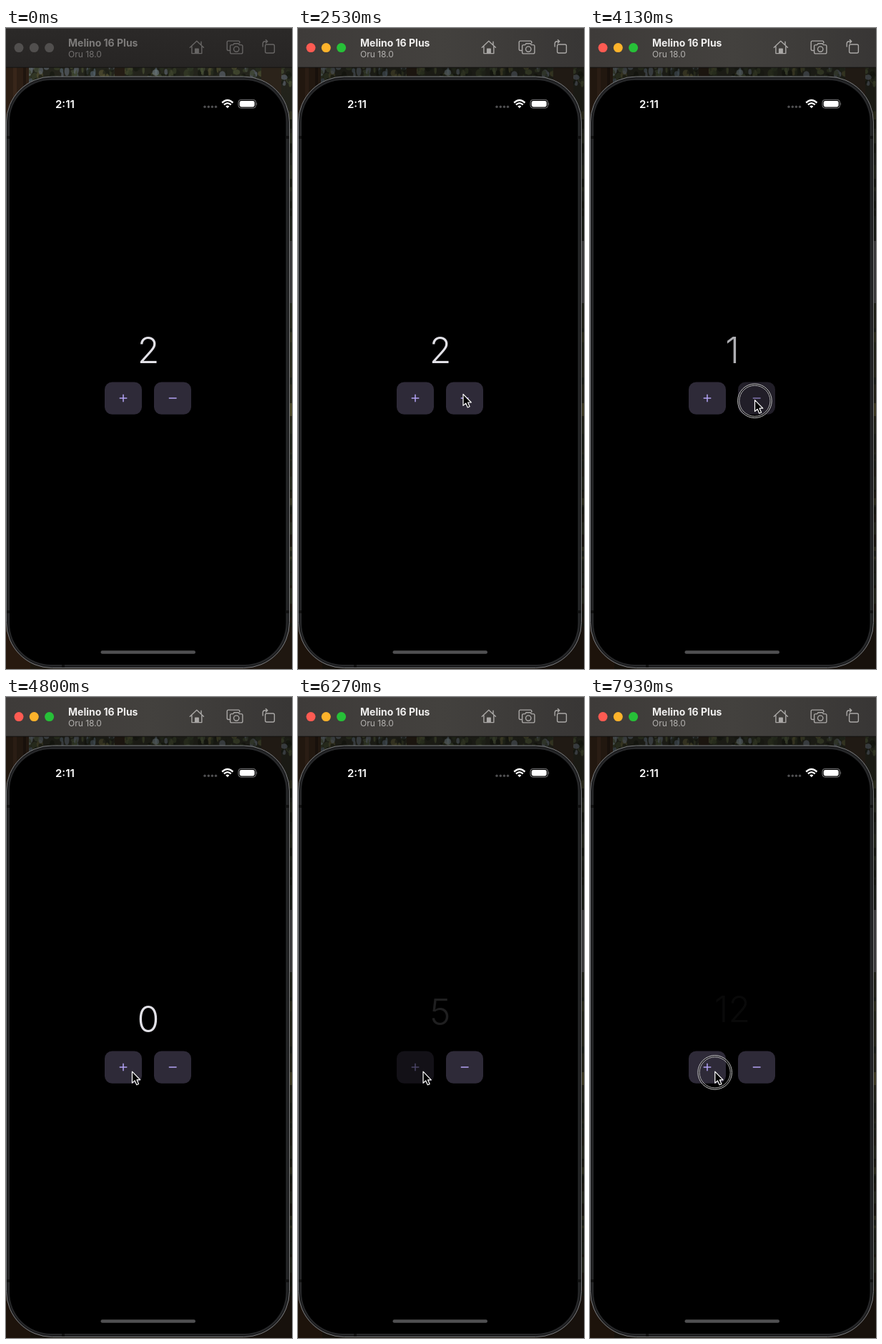
Animation, 400 px wide and 897 px high, one loop 8000 ms. Source, as an HTML page:

```html
<!DOCTYPE html>
<html lang="en">
<head>
<meta charset="utf-8">
<title>Counter</title>
<style>
  html, body { margin: 0; width: 100%; height: 100%; overflow: hidden; background: #000; }
  svg { display: block; width: 100vw; height: 100vh; }
  text { font-family: Inter, Roboto, sans-serif; }
  .bar { --icon: #676564; --title: #7d7b7a; --sub: #737170; }
  .bar.on { --icon: #aaa8a6; --title: #f0efee; --sub: #b3b1af; }
  .bar .fill { fill: url(#idle); }
  .bar.on .fill { fill: url(#live); }
  .bar circle.light { fill: #514f4e; }
  .bar.on .close { fill: #fe5b52; }
  .bar.on .min { fill: #fdb32b; }
  .bar.on .max { fill: #27c038; }
  .title { fill: var(--title); font-weight: 700; font-size: 14px; }
  .sub { fill: var(--sub); font-size: 12px; }
  .icons { fill: none; stroke: var(--icon); stroke-width: 1.4; stroke-linejoin: round; stroke-linecap: round; }
  .sign { stroke: #b3a2f4; stroke-width: 1.5; }
  #num { font-size: 50px; font-weight: 340; text-anchor: middle; fill: #e2e1e7; }
</style>
</head>
<body>
<svg viewBox="0 0 400 897" preserveAspectRatio="none">
  <defs>
    <linearGradient id="idle" x2="0" y2="1">
      <stop stop-color="#2b2928"/><stop offset="1" stop-color="#272524"/>
    </linearGradient>
    <linearGradient id="live" x2="1" y2="0">
      <stop stop-color="#3e3b39"/><stop offset=".5" stop-color="#43413e"/><stop offset="1" stop-color="#383635"/>
    </linearGradient>
    <linearGradient id="wood" x2="0" y2="1">
      <stop stop-color="#26261d"/><stop offset=".3" stop-color="#1b1d18"/>
      <stop offset=".55" stop-color="#2a2a1c"/><stop offset=".8" stop-color="#1a160f"/>
      <stop offset="1" stop-color="#1f160e"/>
    </linearGradient>
    <clipPath id="strip"><rect y="55" width="400" height="842"/></clipPath>
  </defs>

  <g clip-path="url(#strip)">
    <rect width="400" height="897" fill="url(#wood)"/>
    <g id="forest"></g>
    <rect id="shade" width="400" height="897" opacity="0"/>
  </g>

  <rect x="396" y="298" width="4" height="87" fill="#363637"/>
  <rect x=".5" y="68" width="396" height="827.5" rx="64" fill="#27282a" stroke="#77787a" stroke-width="1"/>
  <rect x="2.2" y="69.8" width="392.6" height="824" rx="62" fill="none" stroke="#161617" stroke-width="1"/>
  <path d="M1 153H5M392 153H396M1 817H5M392 817H396M80 891V895" stroke="#111" stroke-width="4"/>
  <rect x="5" y="73" width="386.5" height="818" rx="58"/>

  <g fill="#fff">
    <text x="69" y="112" font-size="15" font-weight="600">2:11</text>
    <g fill="#505052">
      <circle cx="278" cy="110.3" r="1.7"/><circle cx="283.3" cy="110.3" r="1.7"/>
      <circle cx="288.4" cy="110.3" r="1.7"/><circle cx="293.5" cy="110.3" r="1.7"/>
    </g>
    <g fill="none" stroke="#fff" stroke-width="2.3">
      <path d="M302.2 104.6Q309.8 97.4 317.4 104.6"/>
      <path d="M304.9 107.4Q309.8 102.8 314.7 107.4"/>
    </g>
    <path d="M307.2 109.6Q309.8 107.2 312.4 109.6L309.8 112.2Z"/>
    <rect x="325" y="100.3" width="24.5" height="11.8" rx="3.8" fill="none" stroke="#808082"/>
    <rect x="326.7" y="102" width="21" height="8.4" rx="2.4"/>
    <path d="M350.6 104.3Q352.2 106.2 350.6 108.1Z" fill="#808082"/>
  </g>

  <text id="num" x="199" y="469">2</text>
  <g id="plus">
    <rect x="138" y="495.5" width="52" height="45.3" rx="10.5" fill="#2e2a38"/>
    <path class="sign" d="M158.7 518H169.3M164 512.7V523.3"/>
  </g>
  <g id="minus">
    <rect x="207" y="495.5" width="52" height="45.3" rx="10.5" fill="#2e2a38"/>
    <path class="sign" d="M227.8 518H238.6"/>
  </g>
  <rect x="132.5" y="871.3" width="132.5" height="4.4" rx="2.2" fill="#505052"/>

  <g id="bar" class="bar">
    <rect class="fill" width="400" height="55"/>
    <path d="M0 .5H400" stroke="#4b4948"/>
    <path d="M0 55.2H400" stroke="#131211"/>
    <circle class="light close" cx="18" cy="27.6" r="6.5"/>
    <circle class="light min" cx="39.3" cy="27.6" r="6.5"/>
    <circle class="light max" cx="60.6" cy="27.6" r="6.5"/>
    <text class="title" x="87" y="25.6">Melino 16 Plus</text>
    <text class="sub" x="87" y="40.6">Oru 18.0</text>
    <g class="icons">
      <path d="M257.3 27.2L266.8 18.2L276.4 27.2M259.9 25.4V35.6H273.8V25.4M273 23.6V19.2"/>
      <path d="M264.6 35V29.2H269.2V35Z" fill="var(--icon)"/>
      <path d="M312.5 31.5H311Q309.2 31.5 309.2 29.5V20Q309.2 18.1 311 18.1H325Q326.8 18.1 326.8 20V21"/>
      <path d="M315.5 23.6H317.6L319 21.8H325L326.4 23.6H329Q330.9 23.6 330.9 25.5V34Q330.9 35.9 329 35.9H315.5Q313.6 35.9 313.6 34V25.5Q313.6 23.6 315.5 23.6Z"/>
      <circle cx="322.2" cy="29.6" r="3.7"/>
      <rect x="362.6" y="23" width="12.8" height="12" rx="2"/>
      <path d="M359.2 26V22Q359.2 18.7 362.4 18.7H365.5M363.4 16.4L365.8 18.7L363.4 21"/>
    </g>
  </g>

  <g id="ring" fill="none" stroke="#d8d8d8">
    <circle r="22.7" stroke="#000" stroke-opacity=".5" stroke-width="2"/>
    <circle r="23.8" stroke-width=".9"/>
    <circle r="21.6" stroke-width=".8"/>
  </g>
  <path id="cursor" d="M0 0V16L3.7 12.7L6.3 18.6L9.1 17.4L6.6 11.6H11.3Z" fill="#000" stroke="#fff" stroke-width="1.2" stroke-linejoin="round"/>
</svg>

<script>
const LOOP = 8000;
const $ = id => document.getElementById(id);
const clamp = v => Math.max(0, Math.min(1, v));
const span = (t, a, b) => clamp((t - a) / (b - a));

// time, x, y of the pointer tip
const path = [
  [850, 118, 900], [1450, 147.6, 657.4], [1660, 147.6, 657.4], [2220, 231, 512.4],
  [2900, 231, 512.4], [3300, 230.5, 520.6], [4300, 230.5, 520.6], [4850, 175.2, 524.2], [8000, 174.8, 524.2]
];

// time, change of the count
const taps = [
  [2360, 0], [3400, -1], [4075, -1], [5040, 1], [5270, 1],
  [5460, 1], [5690, 1], [5915, 1], [6142, 1]
];
for (let i = 1; i < 8; i++) taps.push([6142 + i * 235.5, 1]);
taps.push([7920, 1]);
const ACTIVE_AT = taps[0][0];

function paintForest() {
  let seed = 11;
  const rnd = () => (seed = seed * 16807 % 2147483647) / 2147483647;
  const pick = list => list[rnd() * list.length | 0];
  const rect = (x, y, w, h, c) => `<rect x="${x}" y="${y}" width="${w}" height="${h}" fill="${c}"/>`;
  const leaves = ["#4c5335", "#39402a", "#5d6670", "#1b1f17", "#575434", "#141710", "#2a2f20"];
  const sky = ["#56646f", "#6f7b80", "#475039", "#3a4530"];
  const dark = ["#1c2018", "#25281c", "#31311f", "#15170f"];
  let out = "";
  for (let i = 0; i < 200; i++) {
    const x = 30 + rnd() * 370, y = 54 + rnd() * 26;
    const open = x < 130 || (x > 200 && x < 215) || (x > 250 && x < 290);
    out += `<ellipse cx="${x}" cy="${y}" rx="${1 + rnd() * 4}" ry="${2 + rnd() * 5}" fill="${pick(open && rnd() < .4 ? sky : leaves)}" opacity=".65"/>`;
  }
  for (let i = 0; i < 60; i++) out += rect(396, 80 + rnd() * 760, 4, 4 + rnd() * 14, pick(dark));
  out += rect(0, 55, 32, 110, "#2c1e14") + rect(10, 55, 5, 110, "#38261a") + rect(24, 55, 4, 110, "#1f150e");
  out += rect(152, 55, 14, 20, "#241c14") + rect(357, 55, 28, 60, "#2b231a");
  out += rect(396, 525, 4, 18, "#4a4728");
  out += rect(0, 800, 34, 97, "#27190f") + rect(34, 850, 70, 47, "#1c170f") + rect(330, 840, 70, 57, "#1f1710");
  $("forest").innerHTML = out;
}

function pointer(t) {
  for (let i = 1; i < path.length; i++) {
    const [t0, x0, y0] = path[i - 1], [t1, x1, y1] = path[i];
    if (t > t1) continue;
    const p = span(t, t0, t1), e = p * p * (3 - 2 * p);
    return [x0 + (x1 - x0) * e, y0 + (y1 - y0) * e];
  }
  return path[path.length - 1].slice(1);
}

function draw(t) {
  let count = 2, alpha = 1, shift = 0, ring = 0;
  const dim = { plus: 1, minus: 1 };

  for (const [at, step] of taps) {
    const d = t - at;
    if (d < 0) break;
    ring = 1 - span(d, 85, 115);
    if (!step) continue;
    dim[step > 0 ? "plus" : "minus"] = 1 - .6 * (span(d, 20, 100) - span(d, 128, 165));
    if (d < 145) {
      const q = span(d, 30, 145);
      alpha *= 1 - q;
      shift -= 16 * q ** 3;
    } else {
      const q = span(d, 145, 265);
      count += step;
      alpha = q;
      shift = 12 * (1 - q) ** 1.5;
    }
  }

  const num = $("num");
  if (num.textContent !== String(count)) num.textContent = count;
  num.setAttribute("opacity", alpha);
  num.setAttribute("transform", `translate(0 ${shift})`);
  for (const id in dim) $(id).setAttribute("opacity", dim[id]);

  const [x, y] = pointer(t);
  $("cursor").setAttribute("transform", `translate(${x} ${y})`);
  $("cursor").setAttribute("opacity", t < path[0][0] ? 0 : 1);
  $("ring").setAttribute("transform", `translate(${x - .1} ${y + 1.2})`);
  $("ring").setAttribute("opacity", ring);

  const on = t >= ACTIVE_AT;
  $("bar").classList.toggle("on", on);
  $("shade").setAttribute("opacity", on ? .25 : 0);
}

function tick() {
  draw(performance.now() % LOOP);
  requestAnimationFrame(tick);
}

paintForest();
tick();
</script>
</body>
</html>
```
